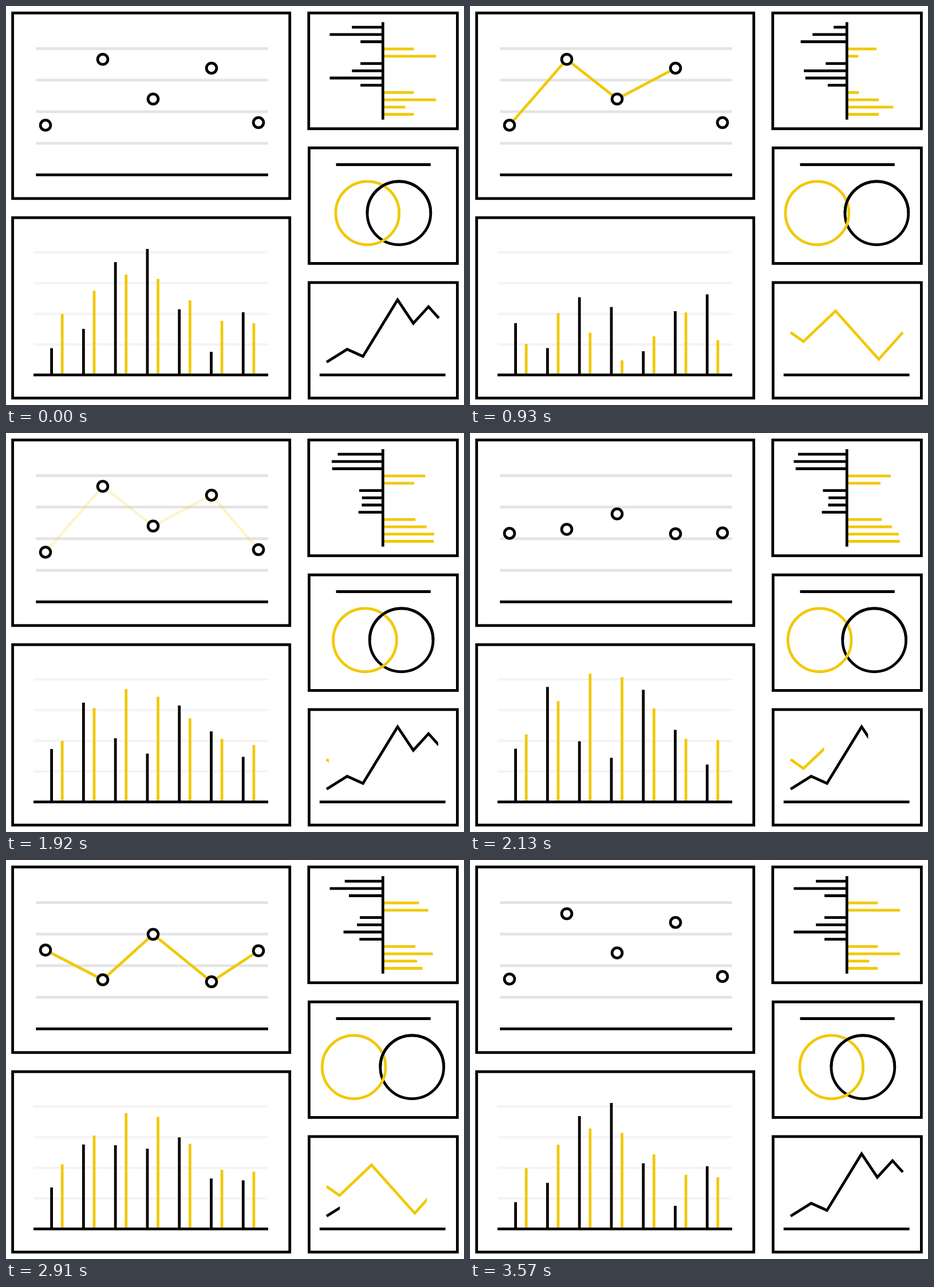
These frames come from a looping animation (800x698 px, 3600 ms). An HTML page with a canvas:

```html
<!DOCTYPE html>
<html>
<head>
<meta charset="utf-8">
<title>Charts</title>
<style>
  html, body { margin: 0; width: 100%; height: 100%; overflow: hidden; background: #fff; }
  canvas { display: block; }
</style>
</head>
<body>
<canvas id="stage" width="800" height="698"></canvas>
<script>
const ctx = document.getElementById('stage').getContext('2d');
const BLACK = '#000', YELLOW = '#f0c905', STROKE = 4.8;
const TICK = 30, TICKS = 120;

// Bar length by index: a cosine with its crest at index `peak`
const wave = (mean, amp, freq, peak) => i => mean + amp * Math.cos(freq * (i - peak));

// Each series runs through three poses
const BLACK_BARS = [wave(133, 95, 1.325, 2.65), wave(94, 55, 1.92, 2.4), wave(127, 72, 2, 1.05)];
const YELLOW_BARS = [wave(130, 45, 0.95, 2.3), wave(65, 42, 1.65, 4.95), wave(163, 64, 1, 2.4)];
const PYRAMID = [wave(62, 32, 2.094, 0.87), wave(50, 31, 1.38, 1.9), wave(62, 31, 0.6, 1.2)];

// x, first y, second y
const DOTS = [[69, 208.5, 157.6], [169, 93.3, 209.5], [257, 162.7, 130], [359, 108.7, 213], [441, 204, 158.8]];
const TREND_BLACK = [[560, 623], [596, 600.5], [623.5, 613], [684, 514], [711.5, 555], [738, 526], [756, 546]];
const TREND_YELLOW = [[560, 571], [582.5, 587], [638.5, 533.5], [714, 618], [756, 571]];

const ramp = (t, from, to) => Math.min(1, Math.max(0, (t - from) / (to - from)));
const ease = (t, from, to) => {
  const s = ramp(t, from, to);
  return s * s * (3 - 2 * s);
};
const lerp = (a, b, k) => a + (b - a) * k;

// Pose lengths at time t: a move every 40 ticks, back to the first pose at the end
function pose([a, b, c], t, delay, duration) {
  const [p, q, r] = [0, 40, 80].map(s => ease(t, s + delay, s + delay + duration));
  return i => a(i) * (1 - p + r) + b(i) * (p - q) + c(i) * (q - r);
}

function path(points, color = BLACK, width = STROKE) {
  ctx.strokeStyle = color;
  ctx.lineWidth = width;
  ctx.beginPath();
  points.forEach(([x, y]) => ctx.lineTo(x, y));
  ctx.stroke();
}

const hline = (x1, x2, y, color, width) => path([[x1, y], [x2, y]], color, width);

function circle(x, y, r, color, fill = 'transparent') {
  ctx.strokeStyle = color;
  ctx.fillStyle = fill;
  ctx.lineWidth = STROKE;
  ctx.beginPath();
  ctx.arc(x, y, r, 0, 2 * Math.PI);
  ctx.fill();
  ctx.stroke();
}

function panel(left, top, right, bottom) {
  ctx.strokeStyle = BLACK;
  ctx.lineWidth = STROKE;
  ctx.strokeRect(left, top, right - left, bottom - top);
}

function clipped(x, y, w, h, draw) {
  ctx.save();
  ctx.beginPath();
  ctx.rect(x, y, w, h);
  ctx.clip();
  draw();
  ctx.restore();
}

function dotChart(t) {
  panel(11.6, 12.2, 495.7, 336.8);
  for (let i = 0; i < 4; i++) hline(52.3, 457.8, 74.5 + 55.2 * i, '#e4e4e4');
  hline(52.3, 457.8, 295.4);

  const second = t >= 65;
  const edge = second ? ease(t, 70, 100) : ease(t, 10, 40);
  const fade = second ? ramp(t, 106, 110) : ramp(t, 60, 65);
  clipped(62, 20, 384 * edge, 300, () => {
    ctx.globalAlpha = 1 - fade;
    path(DOTS.map(([x, y1, y2]) => [x, second ? y2 : y1]), YELLOW);
  });

  const shift = ease(t, 65, 75) - ease(t, 108, 119.5);
  DOTS.forEach(([x, y1, y2]) => circle(x, lerp(y1, y2, shift), 8.9, BLACK, '#fff'));
}

function barChart(t) {
  panel(11.6, 370.3, 495.7, 685.9);
  for (let i = 0; i < 4; i++) hline(48, 457.5, 431 + 53.7 * i, '#f4f4f4', 4);
  const bars = (poses, left, color) => {
    const height = pose(poses, t, 5, 26);
    for (let i = 0; i < 7; i++) {
      const x = left + 55.78 * i;
      path([[x, 643], [x, 643 - height(i)]], color);
    }
  };
  bars(BLACK_BARS, 79.6, BLACK);
  bars(YELLOW_BARS, 98.2, YELLOW);
  hline(48, 458, 645.4);
}

function pyramidChart(t) {
  panel(528.8, 12.2, 788.4, 214.7);
  const axis = 658.3;
  const length = pose(PYRAMID, t, 0, 30);
  for (let i = 0; i < 13; i++) {
    const right = i === 3 || i === 4 || i > 8;
    hline(axis, axis + (right ? 1 : -1) * length(i), 37.1 + 12.7 * i, right ? YELLOW : BLACK);
  }
  path([[axis, 28.2], [axis, 198.8]]);
}

function vennChart(t) {
  panel(529.4, 248.2, 788.4, 450.4);
  hline(576.5, 741.8, 277.5);
  const u = t % 60;
  const apart = ease(u, 0, 15) - ease(u, 35, 50);
  const black = () => circle(686.4 + 24 * apart, 362.2, 55.4, BLACK);
  black();
  circle(631.3 - 24.9 * apart, 362.2, 55.4, YELLOW);
  // The rings interlock: black passes over in the upper half
  clipped(530, 290, 258, 72, black);
}

function trendChart(t) {
  panel(529.4, 483.8, 788.4, 685.9);
  const u = t % 60;
  const wipe = (points, color, amount) =>
    clipped(553.7, 490, 212.7 * amount, 150, () => path(points, color));
  wipe(TREND_YELLOW, YELLOW, ease(u, 0, 30) - ease(u, 30, 59));
  wipe(TREND_BLACK, BLACK, 1 - ease(u, 0, 28.4) + ease(u, 30, 60));
  hline(547.8, 767.6, 645.4);
}

const start = performance.now();

function frame() {
  const t = Math.floor((performance.now() - start) / TICK) % TICKS;
  ctx.fillStyle = '#fff';
  ctx.fillRect(0, 0, 800, 698);
  [dotChart, barChart, pyramidChart, vennChart, trendChart].forEach(draw => draw(t));
  requestAnimationFrame(frame);
}
frame();
</script>
</body>
</html>
```
